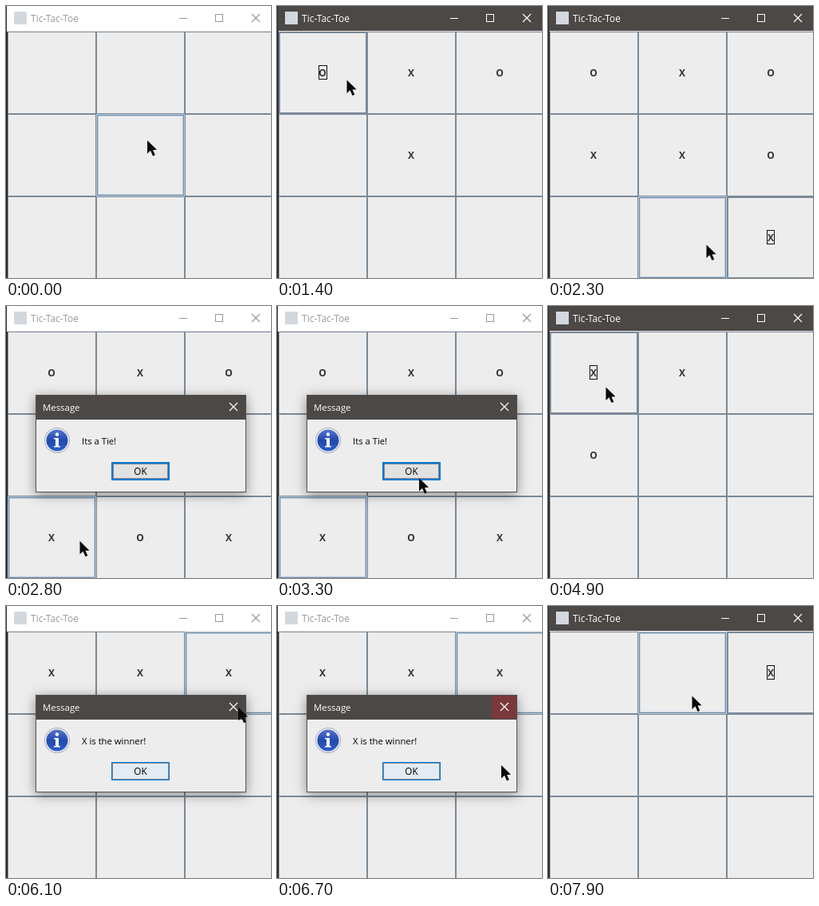
Animation of 332 by 340 pixels, one loop 8000 ms. Source, as an HTML page with a canvas:

```html
<!DOCTYPE html>
<html lang="en">
<head>
<meta charset="utf-8">
<title>Tic-Tac-Toe</title>
<style>
html, body { margin: 0; width: 332px; height: 340px; overflow: hidden; }
canvas { display: block; }
</style>
</head>
<body>
<canvas id="stage" width="332" height="340"></canvas>
<script>
const g = document.getElementById('stage').getContext('2d');
const LOOP = 8000, STEP = 100, DIALOG_DELAY = 200;
const SLATE = '#7a8a99', SKY = '#b8cfe5', BAR = '#4b4846', FACE = '#ededed';
const UI = '"Open Sans", "Noto Sans", sans-serif';

// Cells are clicked in order at an even pace, X first; lean is the pointer's offset in a cell.
const games = [
  { first: 600, gap: 250, cells: '421035876', lean: [30, 9], end: 3500, message: 'Its a Tie!',
    rest: [[3300, 178, 215], [3500, 178, 215]] },
  { first: 4000, gap: 425, cells: '13042', lean: [15, 18], end: 7100, message: 'X is the winner!',
    rest: [[6700, 281, 199], [7100, 184, 212]] },
  { first: 7600, gap: 375, cells: '21', lean: [12, 29], end: LOOP, message: '', rest: [] }
];

const corner = i => [2 + i % 3 * 111, 32 + Math.floor(i / 3) * 103];
const stops = [[0, 177, 168]];
for (const game of games) {
  game.moves = [...game.cells].map((c, i) =>
    ({ time: game.first + i * game.gap, cell: +c, mark: 'XO'[i % 2] }));
  game.dialog = game.moves.at(-1).time + DIALOG_DELAY;
  for (const { time, cell } of game.moves) {
    const [x, y] = corner(cell);
    stops.push([time, x + 55.5 + game.lean[0], y + 51.5 + game.lean[1]]);
  }
  stops.push(...game.rest);
}

function box(x, y, w, h, color) {
  g.fillStyle = color;
  g.fillRect(x, y, w, h);
}

function frame(x, y, w, h, color, width = 1) {
  g.strokeStyle = color;
  g.lineWidth = width;
  g.strokeRect(x + width / 2, y + width / 2, w - width, h - width);
}

function disc(x, y, r, color) {
  g.beginPath();
  g.arc(x, y, r, 0, 7);
  g.fillStyle = color;
  g.fill();
}

function text(s, x, y, color, font = '11.4px', align = 'left') {
  g.font = font + ' ' + UI;
  g.textAlign = align;
  g.fillStyle = color;
  g.fillText(s, x, y);
}

function closeIcon(x, y, color) {
  g.strokeStyle = color;
  g.lineWidth = 1.2;
  g.beginPath();
  g.moveTo(x, y); g.lineTo(x + 10, y + 10);
  g.moveTo(x + 10, y); g.lineTo(x, y + 10);
  g.stroke();
}

// The pointer rests for a fifth of the time at both ends of each move.
function pointerAt(t) {
  const i = stops.findIndex(s => s[0] > t);
  const [t0, x0, y0] = stops[i - 1], [t1, x1, y1] = stops[i];
  const u = Math.min(1, Math.max(0, ((t - t0) / (t1 - t0) - .2) / .6));
  const e = u * u * (3 - 2 * u);
  return [x0 + (x1 - x0) * e, y0 + (y1 - y0) * e];
}

const cellAt = ([x, y]) =>
  Math.min(2, Math.floor((y - 32) / 103)) * 3 + Math.min(2, Math.floor((x - 2) / 111));

function drawWindow(active) {
  const ink = active ? '#fff' : '#999';
  box(0, 0, 332, 340, '#2a2b2f');
  box(1, 0, 331, 32, active ? BAR : '#fff');
  box(2, 31, 330, 1, '#eee6e8');
  box(10, 7, 16, 16, '#d3d8df');
  text('Tic-Tac-Toe', 31, 20, ink, '12px');
  box(217, 15, 10, 1, ink);
  frame(262, 10, 10, 10, ink);
  closeIcon(308, 10, ink);
}

function drawCell(i, mark, hover, focus) {
  const [x, y] = corner(i);
  box(x, y, 111, 103, FACE);
  if (hover && !focus) {
    frame(x, y, 111, 103, SKY, 3);
    frame(x + 1, y + 1, 109, 101, SLATE);
  } else {
    frame(x, y, 111, 103, SLATE, focus ? 2 : 1);
  }
  if (!mark) return;
  text(mark, x + 55, y + 56, '#333', '700 12px', 'center');
  if (focus) frame(x + 50, y + 42, mark === 'X' ? 10 : 11, 18, '#111');
}

function drawInfoIcon(x, y) {
  const blue = g.createLinearGradient(0, y - 14, 0, y + 14);
  blue.addColorStop(0, '#5878cf');
  blue.addColorStop(.5, '#2148ad');
  blue.addColorStop(1, '#2f62cb');
  disc(x, y, 16, '#a9adb8');
  disc(x, y, 15, '#eef0f5');
  disc(x, y, 13.5, blue);
  disc(x, y - 7.5, 2.2, '#fff');
  box(x - 2, y - 3, 4, 11, '#fff');
  box(x - 4, y - 3, 4, 1.5, '#fff');
  box(x - 4, y + 7, 8, 1.5, '#fff');
}

function drawDialog({ message, end }, t) {
  g.save();
  g.shadowColor = 'rgba(0,0,0,.42)';
  g.shadowBlur = 14;
  g.shadowOffsetY = 3;
  box(37, 111, 264, 122, FACE);
  g.restore();
  box(37, 111, 264, 31, BAR);
  frame(37, 111, 264, 122, '#55534f');
  text('Message', 46, 131, '#fff');
  const glow = Math.max(0, 1 - Math.abs(t - 6500) / 285);
  box(269, 112, 31, 29, `rgba(232,17,35,${glow})`);
  closeIcon(280, 121, '#fff');
  drawInfoIcon(64, 168);
  text(message, 95, 173, '#000', '11.3px');

  const tie = end === games[0].end, edge = tie ? 2 : 1;
  box(132, 195, 73, 23, t >= end - STEP ? '#cce4f7' : tie ? '#e1e1e1' : '#e3ebf4');
  frame(132, 195, 73, 23, '#0078d7', edge);
  g.setLineDash([1, 1]);
  frame(132 + edge, 195 + edge, 73 - 2 * edge, 23 - 2 * edge, '#222');
  g.setLineDash([]);
  text('OK', 168.5, 211, '#000', '11.7px', 'center');
}

function drawPointer([x, y]) {
  const arrow = [[0, 0], [0, 16.5], [4, 12.8], [7, 19.5], [9.8, 18.2], [7, 12], [12, 11.8]];
  g.beginPath();
  arrow.forEach(([dx, dy]) => g.lineTo(x + dx, y + dy));
  g.fillStyle = '#0a0a0a';
  g.fill();
}

function draw(t) {
  const game = games.find(p => t < p.end);
  const open = t >= game.dialog;
  const played = game.moves.filter(m => m.time <= t);
  const last = played.at(-1);
  const marks = [];
  played.forEach(m => marks[m.cell] = m.mark);
  const pointer = pointerAt(t);
  const hovered = open ? last.cell : cellAt(pointer);

  drawWindow(t > 0 && !open);
  for (let i = 0; i < 9; i++) {
    drawCell(i, marks[i], i === hovered, !open && last?.cell === i);
  }
  if (open) drawDialog(game, t);
  drawPointer(pointer);
}

function tick() {
  draw(Math.floor(performance.now() % LOOP / STEP) * STEP);
  requestAnimationFrame(tick);
}
tick();
</script>
</body>
</html>
```
